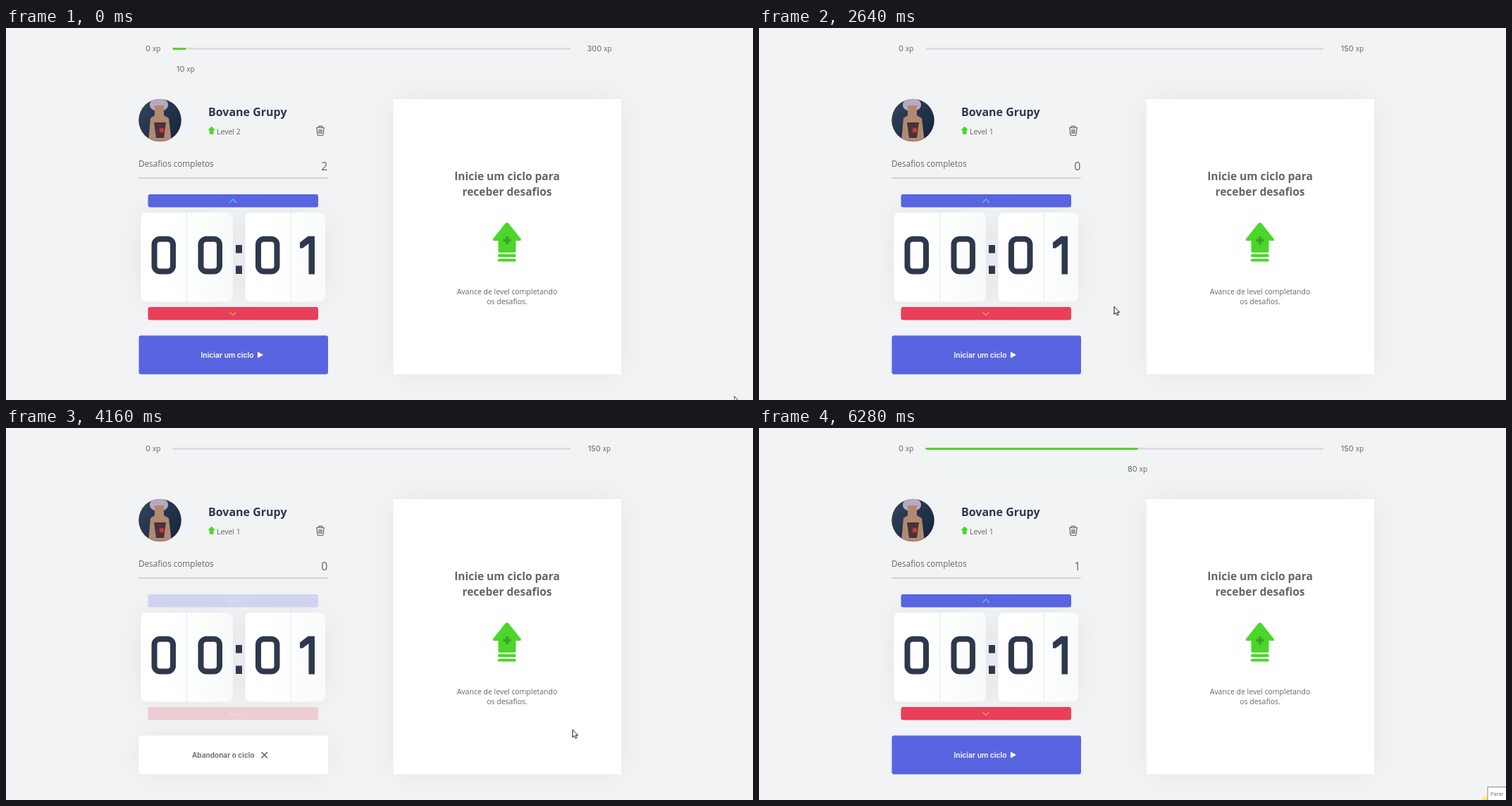
Animation of 1060 by 528 pixels, one loop 6.36 s. Source, as an HTML page:

```html
<!DOCTYPE html>
<html lang="pt">
<head>
<meta charset="utf-8">
<title>Ciclos e desafios</title>
<style>
  html, body { margin: 0; width: 100%; height: 100%; overflow: hidden; background: #f2f3f5; }
  svg { display: block; width: 1060px; height: 528px; }
  text { font: 10.5px "Open Sans", "Noto Sans", sans-serif; fill: #666; }
  .mid { text-anchor: middle; }
  .xp { font: 11px Inter, sans-serif; }
  .xp tspan { font: 10px "Open Sans", sans-serif; }
  .name { font-size: 16px; font-weight: 700; fill: #2e384d; }
  .label { font-size: 11.7px; }
  .count { font-size: 16px; text-anchor: end; }
  .head { font-size: 15.5px; font-weight: 700; }
  .gain { font-size: 13px; font-weight: 600; fill: #5965e0; }
  .task { font-size: 19.1px; font-weight: 600; fill: #2e384d; }
  .small { font-size: 10.4px; }
  .done { font-size: 12.9px; font-weight: 600; }
  .cycle { font: 600 10.3px Inter, sans-serif; }
  .btn { font: 10.1px "Liberation Sans", Arial, sans-serif; fill: #fff; }
  .strong { font-size: 11.1px; font-weight: 700; }
  .title { font: 600 20.6px Inter, sans-serif; fill: #2e384d; }
  .total { font: 600 11.1px Inter, sans-serif; fill: #000; }
  .body { font: 12.45px Inter, sans-serif; }
  .tip { font-size: 7.3px; }
  .blue { fill: #5965e0; }
  .red { fill: #e83f5b; }
  .green { fill: #4cd62b; }
  .white { fill: #fff; }
  .shadow { fill: #000; opacity: .055; filter: blur(20px); }
  .zero { fill: none; stroke: #2e384d; stroke-width: 8; }
  .ink { fill: #2e384d; }
  .line { fill: none; stroke: #666; stroke-width: 1.2; }

  /* Hard switches between states */
  .step { animation: 6360ms step-end infinite; }
  .first { animation-name: first; }
  .second { animation-name: second; }
  .third { animation-name: third; }
  .idle { animation-name: idle; }
  .task-on { animation-name: task-on; }
  .start { animation-name: start; }
  .quit { animation-name: quit; }
  .bars { animation-name: bars; }
  .modal { animation-name: modal; }
  .arrow { animation-name: arrow; }
  .hand { animation-name: hand; }
  .press { animation-name: press; }
  .hint { animation-name: hint; }
  @keyframes first { 0% { opacity: 1 } 38.36%, 100% { opacity: 0 } }
  @keyframes second { 0% { opacity: 0 } 38.36% { opacity: 1 } 72.96%, 100% { opacity: 0 } }
  @keyframes third { 0% { opacity: 0 } 72.96%, 100% { opacity: 1 } }
  @keyframes idle { 0% { opacity: 1 } 67.2% { opacity: 0 } 72.96%, 100% { opacity: 1 } }
  @keyframes task-on { 0% { opacity: 0 } 67.2% { opacity: 1 } 72.96%, 100% { opacity: 0 } }
  @keyframes start { 0% { opacity: 1 } 52.2% { opacity: 0 } 72.96%, 100% { opacity: 1 } }
  @keyframes quit { 0% { opacity: 0 } 52.2% { opacity: 1 } 67.2%, 100% { opacity: 0 } }
  @keyframes bars { 0% { opacity: 1 } 52.2% { opacity: .2 } 72.96%, 100% { opacity: 1 } }
  @keyframes modal { 0% { opacity: 0 } 11.95% { opacity: 1 } 38.36%, 100% { opacity: 0 } }
  @keyframes hand {
    0% { opacity: 0 } 10.8% { opacity: 1 } 11.95% { opacity: 0 } 20.6% { opacity: 1 }
    39.2% { opacity: 0 } 43.6% { opacity: 1 } 53.2% { opacity: 0 } 69.6% { opacity: 1 }
    74% { opacity: 0 } 98.6%, 100% { opacity: 1 }
  }
  @keyframes arrow {
    0% { opacity: 1 } 10.8% { opacity: 0 } 11.95% { opacity: 1 } 20.6% { opacity: 0 }
    39.2% { opacity: 1 } 43.6% { opacity: 0 } 53.2% { opacity: 1 } 69.6% { opacity: 0 }
    74% { opacity: 1 } 98.6%, 100% { opacity: 0 }
  }
  @keyframes press {
    0% { opacity: 0 } 11.2% { opacity: 1 } 11.95% { opacity: 0 } 36.3% { opacity: 1 }
    38.36% { opacity: 0 } 50.7% { opacity: 1 } 52.2% { opacity: 0 } 71.5% { opacity: 1 }
    72.96% { opacity: 0 } 98.6%, 100% { opacity: 1 }
  }
  @keyframes hint { 0% { opacity: 0 } 98.6%, 100% { opacity: 1 } }

  /* Hover fades */
  .trash { animation: trash 6360ms linear infinite; }
  .start-bg { animation: start-bg 6360ms linear infinite; }
  .quit-bg { animation: quit-bg 6360ms ease infinite; }
  .quit-ink { animation: quit-ink 6360ms ease infinite; }
  .confirm { animation: confirm 6360ms linear infinite; }
  @keyframes trash {
    0%, 10.5% { opacity: 1 } 12%, 16.4% { opacity: .12 }
    18.9%, 38.3% { opacity: .6 } 38.4%, 100% { opacity: 1 }
  }
  @keyframes start-bg { 0%, 43.6% { fill: #5965e0 } 46.5%, 55% { fill: #4953b8 } 60%, 100% { fill: #5965e0 } }
  @keyframes quit-bg { 0%, 53.9% { fill: #e83f5b } 57.2%, 100% { fill: #fff } }
  @keyframes quit-ink { 0%, 53.9% { fill: #fff; stroke: #fff } 56.5%, 100% { fill: #666; stroke: #666 } }
  @keyframes confirm { 0%, 20.6% { fill: #f0443a } 23%, 100% { fill: #d63a32 } }

  .pointer { animation: pointer 6360ms linear infinite; }
  @keyframes pointer {
    0%, .6% { transform: translate(1032.5px, 522px); animation-timing-function: ease-in-out }
    10.06% { transform: translate(451px, 148px) }
    11.32%, 16.35% { transform: translate(444.5px, 143px); animation-timing-function: ease-in-out }
    21.4% { transform: translate(592px, 354px); animation-timing-function: ease-out }
    25.79%, 38.36% { transform: translate(579px, 348px); animation-timing-function: ease-in-out }
    45.91% { transform: translate(371px, 477px) }
    48%, 52.2% { transform: translate(366px, 474px); animation-timing-function: ease-in-out }
    55.97% { transform: translate(836px, 410px) }
    57.23%, 61% { transform: translate(838px, 411px); animation-timing-function: ease-in-out }
    68.4%, 69% { transform: translate(786px, 436px) }
    71%, 72.96% { transform: translate(779px, 419px) }
    76.73% { transform: translate(879px, 390px) }
    79.5% { transform: translate(926px, 345px) }
    84.2% { transform: translate(1043px, 470px) }
    86.79% { transform: translate(1002px, 507px) }
    88.05%, 90.5% { transform: translate(998px, 509px) }
    96.23% { transform: translate(1022px, 520px) }
    98.5%, 99.9% { transform: translate(1033px, 531px) }
    100% { transform: translate(1032.5px, 522px) }
  }
</style>
</head>
<body>
<svg viewBox="0 0 1060 528">
  <defs>
    <linearGradient id="cell"><stop offset=".3" stop-color="#fff"/><stop offset="1" stop-color="#f9fbfb"/></linearGradient>
    <linearGradient id="night" x2="1" y2="1"><stop stop-color="#34455b"/><stop offset="1" stop-color="#14233a"/></linearGradient>
    <clipPath id="round"><circle cx="218.5" cy="131" r="30.3"/></clipPath>
    <rect id="zero" class="zero" x="4" y="4" width="26.5" height="46" rx="8"/>
    <path id="colon" class="ink" d="M0 0h9v11.500h-9zM0 29.500h9v11.500h-9z"/>
    <g id="pair">
      <rect class="shadow" width="130.500" height="126.500"/>
      <rect width="130.500" height="126.500" rx="8" fill="url(#cell)"/>
      <path d="M65 0v126.500" stroke="#e6e9ec"/>
    </g>
    <g id="plates">
      <rect class="green" x="669" y="220" width="8" height="32" rx="3"/>
      <rect x="669" y="220" width="4" height="32" rx="2" fill="#3fae28"/>
      <rect x="676" y="215" width="9" height="43" rx="3.500" fill="#4a56c4"/>
      <rect x="680" y="215" width="5" height="43" rx="2.500" fill="#6673ea"/>
    </g>
  </defs>

  <!-- Experience bar -->
  <text class="xp" x="198" y="32.500">0 <tspan>xp</tspan></text>
  <rect x="236.500" y="28" width="564.500" height="3" rx="1" fill="#dcdde0"/>

  <!-- Profile -->
  <g clip-path="url(#round)">
    <rect x="188" y="100" width="61" height="62" fill="url(#night)"/>
    <ellipse cx="217" cy="109" rx="13" ry="9.500" fill="#b9a9bd"/>
    <path d="M211 110h13v14l7 4 4 34h-33l3-34 6-4z" fill="#b08a72"/>
    <path d="M210 134h17l-3 22h-11z" fill="#493238"/>
    <circle cx="221" cy="145" r="3.500" fill="#c33a34"/>
  </g>
  <text class="name" x="287" y="124.500">Bovane Grupy</text>
  <path class="green" d="M291.700 139.500l5.200 5.600h-2.300v5.600h-5.800v-5.600h-2.300z"/>
  <text class="label" x="188" y="196.500">Desafios completos</text>
  <path d="M188 213h269" stroke="#b4b5b8" stroke-width="1.200"/>

  <g class="step first">
    <rect class="green" x="236.500" y="28" width="18.800" height="3" rx="1"/>
    <text class="xp" x="242" y="61.500">10 <tspan>xp</tspan></text>
    <text class="xp mid" x="842" y="32.500">300 <tspan>xp</tspan></text>
    <text x="299" y="150.500">Level 2</text>
    <text class="count" x="456.500" y="201.700">2</text>
  </g>
  <g class="step second">
    <text class="xp mid" x="842" y="32.500">150 <tspan>xp</tspan></text>
    <text x="299" y="150.500">Level 1</text>
    <text class="count" x="456.500" y="201.700">0</text>
  </g>
  <g class="step third">
    <rect class="green" x="236.500" y="28" width="301" height="3" rx="1"/>
    <text class="xp" x="523" y="61.500">80 <tspan>xp</tspan></text>
    <text class="xp mid" x="842" y="32.500">150 <tspan>xp</tspan></text>
    <text x="299" y="150.500">Level 1</text>
    <text class="count" x="456.500" y="201.700">1</text>
  </g>

  <!-- Timer -->
  <g class="step idle">
    <use href="#pair" x="191.500" y="262"/>
    <rect class="shadow" x="339.500" y="262" width="113.500" height="126.500"/>
    <rect x="339.500" y="262" width="113.500" height="126.500" rx="8" fill="url(#cell)"/>
    <path d="M404.500 262v126.500" stroke="#e6e9ec"/>
    <use href="#zero" x="206.500" y="295.500"/>
    <use href="#zero" x="272.500" y="295.500"/>
    <use href="#colon" x="326" y="308"/>
    <use href="#zero" x="354" y="295.500"/>
    <path class="ink" d="M417 304.500l11.500-9h9.500v54h-8.500v-43.500l-8.500 6.500h-4z"/>
  </g>
  <g class="step task-on">
    <use href="#pair" x="183.500" y="262"/>
    <use href="#pair" x="330.500" y="262"/>
    <use href="#zero" x="198" y="295.500"/>
    <use href="#zero" x="264" y="295.500"/>
    <use href="#colon" x="317.500" y="308"/>
    <use href="#zero" x="346" y="295.500"/>
    <use href="#zero" x="411.500" y="295.500"/>
  </g>
  <g class="step bars">
    <rect class="blue" x="201.500" y="236" width="241.500" height="18.500" rx="3"/>
    <path d="M317 248l5-5 5 5" fill="none" stroke="#45c9ee" stroke-width="1.400"/>
    <rect class="red" x="201.500" y="396" width="241.500" height="18.500" rx="3"/>
    <path d="M317.500 403.500l4.500 4 4.500-4" fill="none" stroke="#e9a23b" stroke-width="1.400"/>
  </g>

  <!-- Cycle button -->
  <g class="step start">
    <rect class="start-bg" x="188.500" y="436.500" width="268.500" height="55" rx="3"/>
    <text class="cycle white" x="276.500" y="467.700">Iniciar um ciclo</text>
    <path class="white" d="M357 459.500l8 4.500-8 4.500z"/>
  </g>
  <g class="step quit">
    <rect class="shadow" x="188.500" y="436.500" width="268.500" height="55"/>
    <rect class="quit-bg" x="188.500" y="436.500" width="268.500" height="55" rx="3"/>
    <text class="cycle quit-ink" stroke-width="0" x="264" y="467.700" style="font-size:10.1px">Abandonar o ciclo</text>
    <path class="quit-ink" d="M362.500 460l8.500 8.500m0-8.500l-8.500 8.500" stroke-width="1.600"/>
  </g>
  <g class="step task-on">
    <rect class="shadow" x="188.500" y="436.500" width="268" height="57.500"/>
    <rect class="green" x="188.500" y="474" width="268" height="20" rx="3"/>
    <path class="white" d="M188.500 439.500q0-3 3-3h262q3 0 3 3v52h-268z"/>
    <text class="done" x="263" y="470">Ciclo encerrado</text>
    <circle class="green" cx="374" cy="466" r="5.900"/>
    <path d="M371 466l2.200 2.200 4-4.200" fill="none" stroke="#fff" stroke-width="1.500"/>
  </g>

  <!-- Challenge card -->
  <g class="step idle">
    <rect class="shadow" x="549.500" y="101" width="323.500" height="390.500"/>
    <rect class="white" x="549.500" y="101" width="323.500" height="390.500"/>
    <g class="mid">
      <text class="head" x="711" y="215.700">Inicie um ciclo para</text>
      <text class="head" x="711" y="238">receber desafios</text>
      <text x="711" y="377.500">Avance de level completando</text>
      <text x="711" y="391.800">os desafios.</text>
    </g>
    <g class="green">
      <path d="M708.500 277.300q2.300-2 4.600 0l17.300 21.700q1.500 3-1.400 3h-5.500v15q0 1.700-1.700 1.700h-21.600q-1.700 0-1.700-1.700v-15h-5.800q-2.900 0-1.400-3z"/>
      <rect x="698" y="321" width="25.500" height="4" rx="1.500"/>
      <rect x="698" y="327.500" width="25.500" height="4" rx="1.500"/>
    </g>
    <path d="M711 296v11m-5.500-5.500h11" stroke="#3ba424" stroke-width="3.800"/>
  </g>
  <g class="step task-on">
    <rect class="shadow" x="549.500" y="101" width="323.500" height="393.500"/>
    <rect class="white" x="549.500" y="101" width="323.500" height="393.500"/>
    <g class="mid">
      <text class="gain" x="711" y="176">Ganhe 80 xp</text>
      <text class="task" x="711" y="331">Exercite-se</text>
      <text class="small" x="711" y="366">Sentado, cruze uma perna e incline seu tronco à</text>
      <text class="small" x="711" y="380.500">frente, troque de perna após 10 segundos.</text>
    </g>
    <circle cx="711" cy="197.500" r=".7" fill="#999"/>
    <rect x="663" y="230.500" width="96.500" height="12" rx="2" fill="#4a4e5c"/>
    <rect x="663" y="236.500" width="96.500" height="6" rx="2" fill="#34384a"/>
    <use href="#plates"/>
    <use href="#plates" transform="matrix(-1 0 0 1 1423 0)"/>
    <path d="M693 239h37q1 10-4 17l-1 19h-26l-1-20q-5-6-5-16z" fill="#ffcfbf"/>
    <path d="M722 228q8 0 8 8 1 13-4 20l-1 19h-6l1-23z" fill="#ffb59f"/>
    <g fill="#ffcfbf" stroke="#f3ab96" stroke-width=".8">
      <rect x="693" y="222" width="9" height="16" rx="4.500"/>
      <rect x="701" y="221" width="9" height="16" rx="4.500"/>
      <rect x="709.500" y="221" width="9" height="16" rx="4.500"/>
      <rect x="718" y="222" width="9" height="16" rx="4.500"/>
    </g>
    <path d="M697 243q12-5 21 1-8 4-10 11" fill="none" stroke="#f3ab96"/>
    <path d="M694 273.500h34q2 0 2 3l.5 15.500h-38.500l.5-15.500q0-3 1.500-3z" fill="#ecf4fb"/>
    <path d="M722 273.500h6q2 0 2 3l.5 15.500h-7zM692 289h38v3h-38z" fill="#d5e3f1"/>
    <rect class="red" x="589" y="400.500" width="119.500" height="34" rx="3"/>
    <rect class="green" x="714" y="400.500" width="119.500" height="34" rx="3"/>
    <text class="btn strong mid" x="648.500" y="421">Falhei</text>
    <text class="btn strong mid" x="773.500" y="421">Completei</text>
  </g>

  <!-- Confirmation dialog -->
  <rect class="step modal" width="1060" height="528" fill="#f2f3f5" fill-opacity=".8"/>
  <path class="line trash" d="M440 141.500h12m-8.500 0v-2.200h5v2.200m-7.500 0l.8 9.500q.2 1.500 1.600 1.500h5.200q1.400 0 1.600-1.500l.8-9.500m-7 2.200v6.500m2 -6.500v6.500m2-6.500v6.500"/>
  <g class="step modal">
    <rect class="shadow" x="367" y="158" width="330.500" height="225"/>
    <rect class="white" x="367" y="158" width="330.500" height="225" rx="5"/>
    <g class="mid">
      <text class="title" x="532" y="205.700">Apagar dados atuais</text>
      <text class="total" x="532" y="249.500">Level: 2 | Xp Total: 160 | Desafios Completos:2</text>
      <text class="body" x="532" y="285.700">Tem certeza que quer apagar todos os dados.</text>
      <text class="body" x="532" y="300">Perderá todo o xp acumulado, level e desafios</text>
      <text class="body" x="532" y="314.300">completados</text>
      <rect class="blue" x="454" y="331" width="64" height="24.500" rx="3"/>
      <rect class="confirm" x="538.500" y="331" width="71.500" height="24.500" rx="3"/>
      <text class="btn" x="486" y="346.700">CALCELAR</text>
      <text class="btn" x="574.300" y="346.700">CONFIRMAR</text>
    </g>
  </g>

  <!-- Pointer -->
  <g class="pointer">
    <circle class="step press" r="8.500" fill="#fff000" fill-opacity=".62"/>
    <g fill="#fff" stroke="#111" stroke-linejoin="round">
      <path class="step arrow" d="M.5.500v11l2.500-2.300 1.800 3.800 1.900-.9-1.800-3.600h3.200z"/>
      <path class="step hand" d="M-1.500 1q1.500-2 3 0v5q1-.8 2 .2 1-.6 2 .4 1.500-.4 2 1v4q0 2-1.500 4h-6q-2.500-3-4-6 1-1.500 2.500.3z"/>
    </g>
  </g>
  <g class="step hint">
    <rect x="1034" y="509.500" width="30" height="22" fill="#fff" stroke="#8a8a8a"/>
    <text class="tip" x="1038" y="521.700">Parar</text>
  </g>
</svg>
</body>
</html>
```
